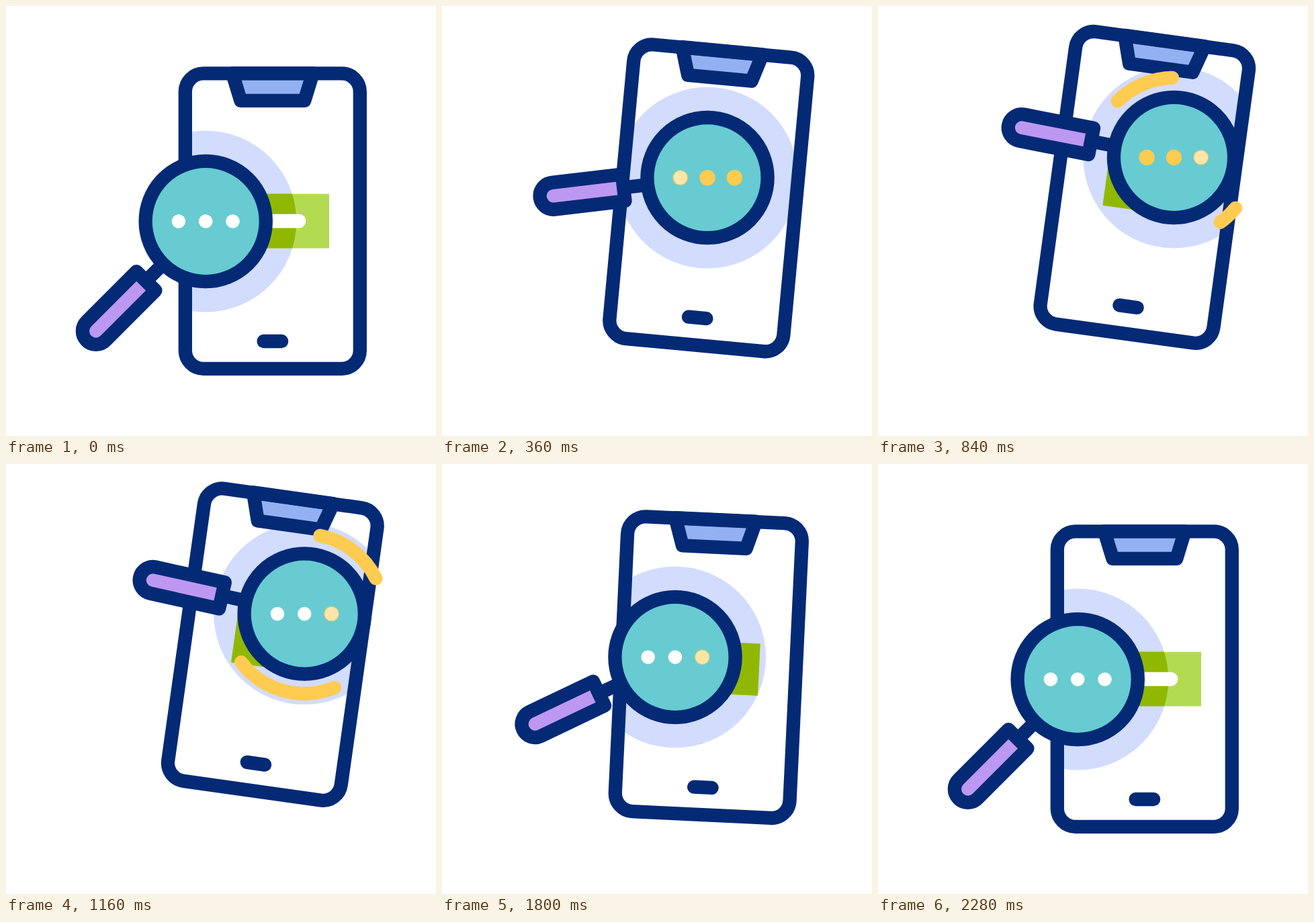
An HTML page for the animation above (2440 ms loop, 640 by 640 pixels).

```html
<!DOCTYPE html>
<html lang="en">
<head>
<meta charset="utf-8">
<title>Phone search</title>
<style>
  html, body { margin: 0; width: 100%; height: 100%; overflow: hidden; background: #fff; }
  svg { display: block; width: 100%; height: 100%; }
  .ink { stroke: #042a76; stroke-width: 20.3; stroke-linejoin: round; stroke-linecap: round; fill: none; }
  .spark { stroke: #ffcb50; stroke-width: 20.2; stroke-linecap: round; fill: none; }
</style>
</head>
<body>
<svg viewBox="0 0 640 640">
  <defs>
    <clipPath id="screen"><rect class="phone" x="-130" y="-219.7" width="260" height="439.4" rx="27"/></clipPath>
    <clipPath id="cardClip"><rect class="card" x="-84.2" y="-40.5" width="168.4" height="81"/></clipPath>
  </defs>

  <g clip-path="url(#screen)"><circle class="lens" r="135" fill="#d2dcfd"/></g>
  <rect class="card" x="-84.2" y="-40.5" width="168.4" height="81" fill="#b3db52"/>
  <g clip-path="url(#cardClip)"><circle class="lens" r="135" fill="#90b803"/></g>
  <path class="card" d="M-39 0H39.3" stroke="#fff" stroke-width="20.6" stroke-linecap="round"/>

  <g class="phone ink">
    <path d="M-60 -220L-47.5 -179.3H47.5L60 -220Z" fill="#93b1f2"/>
    <rect x="-130" y="-219.7" width="260" height="439.4" rx="27"/>
    <path d="M-13.3 178.9H13.3"/>
  </g>

  <path class="spark"/>
  <path class="spark"/>

  <g class="lens">
    <g id="handle" class="ink">
      <path d="M90 0H122"/>
      <path d="M125.7 -20H231A20 20 0 0 1 231 20H125.7Z" fill="#bd98f2"/>
    </g>
    <circle class="ink" r="89.6" style="fill:#67cbd1"/>
    <g id="dots"></g>
  </g>
</svg>
<script>
const LOOP = 2440, STEP = 40, RADIUS = 118.6;
const all = s => [...document.querySelectorAll(s)];
const clamp = v => Math.min(1, Math.max(0, v));
const span = (t, start, length) => clamp((t - start) / length);

// Timing curve with control points (x1, 0) and (x2, 1)
function curve(x1, x2) {
  return u => {
    if (u <= 0 || u >= 1) return clamp(u);
    let lo = 0, hi = 1, s;
    for (let i = 0; i < 30; i++) {
      s = (lo + hi) / 2;
      const r = 1 - s;
      const x = 3 * r * r * s * x1 + 3 * r * s * s * x2 + s * s * s;
      if (x < u) lo = s; else hi = s;
    }
    return s * s * (3 - 2 * s);
  };
}
const rush = curve(0.333, 0);
const swing = curve(0.567, 0.43);

// Angles in degrees; head and tail are [start, length] in ms
const sparks = [
  { from: 225, to: 337, head: [471, 818], tail: [840, 640] },
  { from: 39.5, to: 157.3, head: [620, 760], tail: [892, 717] }
];

const phones = all('.phone'), cards = all('.card'), lenses = all('.lens');
const sparkPaths = all('.spark');
const handle = document.getElementById('handle');
const dotBox = document.getElementById('dots');

function addDot(x, r, fill) {
  const c = document.createElementNS('http://www.w3.org/2000/svg', 'circle');
  c.setAttribute('cx', x);
  c.setAttribute('r', r);
  c.setAttribute('fill', fill);
  dotBox.append(c);
  return c;
}
const glows = [-40.3, 0, 40.3].map(x => {
  addDot(x, 10.3, '#fff');
  return addDot(x, 11.7, '#ffcb50');
});

const place = (list, transform) => list.forEach(e => e.setAttribute('transform', transform));

// Three blinks, 320 ms on and 320 ms off, each dot 80 ms after the last
function glow(t, i) {
  const local = t - 80 * i;
  let sum = 0;
  for (let n = 0; n < 3; n++) {
    sum += span(local, 640 * n, 80) - span(local, 640 * n + 320, 80);
  }
  return sum;
}

function arc(cx, cy, a, b) {
  const at = deg => {
    const q = deg * Math.PI / 180;
    return (cx + RADIUS * Math.cos(q)).toFixed(2) + ' ' + (cy + RADIUS * Math.sin(q)).toFixed(2);
  };
  return `M${at(a)}A${RADIUS} ${RADIUS} 0 0 1 ${at(b)}`;
}

function draw(t) {
  const p = t < 1160 ? rush(span(t, 0, 1120)) : 1 - swing(span(t, 1160, 1120));
  const x = 297.2 + 147 * p, y = 320.5 - 97.5 * p;
  const body = `translate(396.8 ${320.1 - 51.5 * p}) rotate(${8 * p})`;

  place(phones, body);
  place(cards, `${body} scale(${1 - 0.318 * p} ${1 - 0.135 * p})`);
  place(lenses, `translate(${x} ${y})`);
  place([handle], `rotate(${135 + 57.5 * p})`);

  sparks.forEach((s, i) => {
    const head = swing(span(t, ...s.head)), tail = swing(span(t, ...s.tail));
    const at = k => s.from + (s.to - s.from) * k;
    sparkPaths[i].setAttribute('d', head - tail > 0.002 ? arc(x, y, at(tail), at(head)) : '');
  });
  glows.forEach((g, i) => g.setAttribute('opacity', glow(t, i)));
}

function tick() {
  const t = performance.now() % LOOP;
  draw(Math.floor(t / STEP) * STEP);
  requestAnimationFrame(tick);
}
tick();
</script>
</body>
</html>
```
